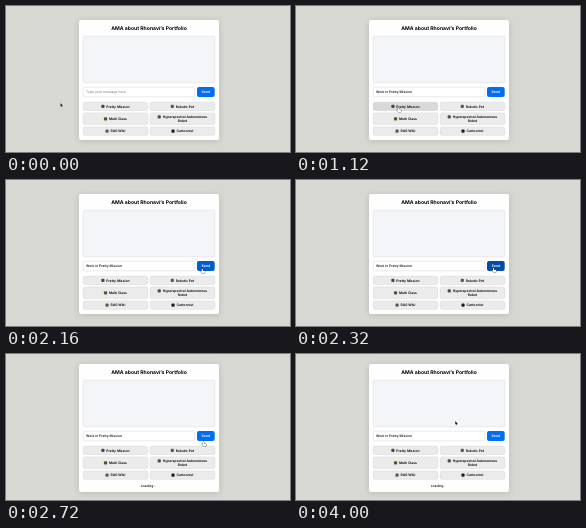
These frames come from a looping animation (284 px wide and 146 px high, 8000 ms). An HTML page with a canvas:

```html
<!DOCTYPE html>
<html lang="en">
<head>
<meta charset="utf-8">
<title>Portfolio chat</title>
<style>
  html, body { margin: 0; width: 100%; height: 100%; overflow: hidden; background: #d8d8d3; }
  canvas { display: block; width: 284px; height: 146px; }
</style>
</head>
<body>
<canvas></canvas>
<script>
const LOOP = 8000, STEP = 80, SUBMIT = 2400;
const canvas = document.querySelector('canvas');
const ctx = canvas.getContext('2d');
const dpr = window.devicePixelRatio || 1;
canvas.width = 284 * dpr;
canvas.height = 146 * dpr;

const ramp = (t, from, to) => Math.min(1, Math.max(0, (t - from) / (to - from)));
const ease = p => p * p * (3 - 2 * p);
const mix = (a, b, p) => `rgb(${a.map((v, i) => Math.round(v + (b[i] - v) * p))})`;

// start, end, target x, target y
const moves = [
  [240, 1040, 102, 101.5],
  [1200, 1680, 179.5, 98.5],
  [1760, 2240, 197, 88],
  [3040, 3280, 159.3, 67]
];

// x, y, height, icon colour, label lines
const options = [
  [77, 96, 8.7, '#45484c', ['Pretty Mission']],
  [144, 96, 8.7, '#55585a', ['Robotic Pet']],
  [77, 106.8, 12, '#4c5a26', ['Multi Class']],
  [144, 106.8, 12, '#455452', ['Hyperspectral Autonomous', 'Robot']],
  [77, 120.8, 8.7, '#5a5a5a', ['RAG Wiki']],
  [144, 120.8, 8.7, '#1c1c1c', ['Cartoonist']]
];

function box(x, y, w, h, r, fill, stroke) {
  ctx.beginPath();
  ctx.roundRect(x, y, w, h, r);
  ctx.fillStyle = fill;
  ctx.fill();
  if (stroke) {
    ctx.beginPath();
    ctx.roundRect(x + .2, y + .2, w - .4, h - .4, r);
    ctx.strokeStyle = stroke;
    ctx.lineWidth = .4;
    ctx.stroke();
  }
}

function text(str, x, y, size, color, weight = 400, align = 'center') {
  ctx.font = `${weight} ${size}px Inter, sans-serif`;
  ctx.textAlign = align;
  ctx.fillStyle = color;
  ctx.fillText(str, x, y);
}

function option([x, y, h, icon, lines], hover) {
  box(x, y, 65, h, 2, mix([235, 235, 235], [217, 217, 217], hover), '#d6d6d6');
  const mid = x + 32.5, top = y + h / 2 - (lines.length - 1) * 2 + 1.2;
  lines.forEach((line, i) => text(line, mid + (i ? 0 : 2.4), top + i * 4, 3.35, '#000', 600));
  const left = mid - ctx.measureText(lines[0]).width / 2 - 1;
  box(left - 1.6, top - 2.8, 3.2, 3.2, 1, icon);
}

function pointer(x, y, hand) {
  const shape = new Path2D(hand
    ? 'M0 .3Q.5-.3 1 .3V1.7L3 2.1Q3.5 2.3 3.3 3L2.8 4.5H.5L-1 2.7Q-1 2 0 2.5Z'
    : 'M0 0V3.6L.8 2.9L1.4 4.2L2 3.9L1.4 2.7H2.5Z');
  ctx.save();
  ctx.translate(x, y);
  ctx.lineWidth = .6;
  ctx.strokeStyle = hand ? '#111' : '#fff';
  ctx.fillStyle = hand ? '#fff' : '#111';
  ctx.stroke(shape);
  ctx.fill(shape);
  ctx.restore();
}

function draw(t) {
  const sent = t >= SUBMIT, grow = sent ? 4 : 0;
  ctx.setTransform(dpr, 0, 0, dpr, 0, 0);
  ctx.textRendering = 'geometricPrecision';
  ctx.fillStyle = '#d8d8d3';
  ctx.fillRect(0, 0, 284, 146);

  ctx.save();
  ctx.shadowColor = 'rgba(0,0,0,.14)';
  ctx.shadowBlur = 6 * dpr;
  ctx.shadowOffsetY = dpr;
  box(73, 14 - grow, 140, 120 + 2 * grow, 2, '#fefefe');
  ctx.restore();

  ctx.save();
  ctx.translate(0, -grow);
  text('AMA about Rhonavi\u2019s Portfolio', 143, 23.8, 5.1, '#000', 700);
  box(77, 30, 132, 47, 1.5, '#f4f5f8', '#d6d7da');
  box(77, 81, 112, 10, 1.5, '#fff', '#c9c9c9');
  if (t < 1040) text('Type your message here...', 80, 87.3, 3.4, '#757575', 400, 'left');
  else text('Work in Pretty Mission', 80, 87.3, 3.35, '#000', 500, 'left');

  const press = ramp(t, 2080, 2240) * (1 - ramp(t, 2480, 2720));
  box(191, 81, 17.7, 10, 2, mix([0, 110, 242], [0, 76, 166], press));
  text('Send', 199.9, 87.3, 3.5, '#fff', 600);

  const hovers = [
    ramp(t, 720, 960) * (1 - ramp(t, 1360, 1600)),
    ramp(t, 1440, 1680) * (1 - ramp(t, 1920, 2160))
  ];
  options.forEach((item, i) => option(item, hovers[i] || 0));
  ctx.restore();
  if (sent) text('Loading...', 142.5, 133, 3.3, '#000', 500);

  let x = 54.5, y = 97;
  for (const [from, to, tx, ty] of moves) {
    const p = ease(ramp(t, from, to));
    x += (tx - x) * p;
    y += (ty - y) * p;
  }
  pointer(x, y, y > 80 && x > 77);
}

function tick(now) {
  draw(Math.floor(now % LOOP / STEP) * STEP);
  requestAnimationFrame(tick);
}
draw(0);
requestAnimationFrame(tick);
</script>
</body>
</html>
```
